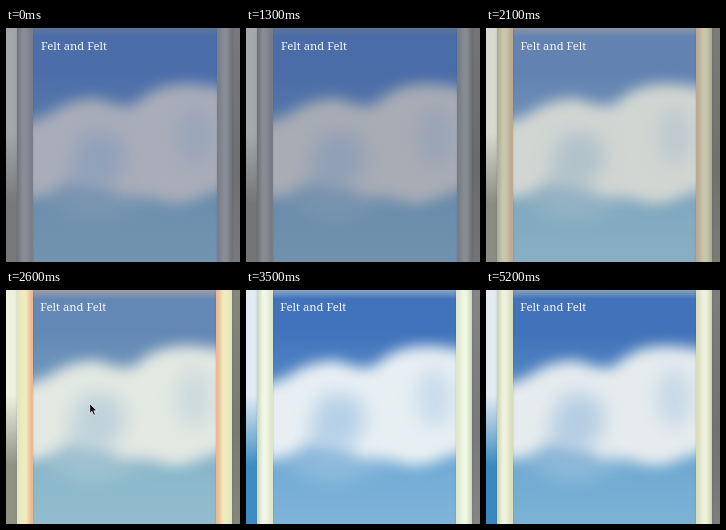
Write an HTML page that moves like this. It is 234 px wide and 234 px high and loops after 5300 ms.

```html
<!DOCTYPE html>
<html lang="en">
<head>
<meta charset="utf-8">
<title>Felt and Felt</title>
<style>
@property --sky { syntax: "<color>"; inherits: true; initial-value: #4b6daa; }
@property --low { syntax: "<color>"; inherits: true; initial-value: #6d90ae; }
@property --cloud { syntax: "<color>"; inherits: true; initial-value: #a9adb9; }
@property --shade { syntax: "<color>"; inherits: true; initial-value: #8b9ebb; }
@property --outer { syntax: "<color>"; inherits: true; initial-value: #6d727b; }
@property --mid { syntax: "<color>"; inherits: true; initial-value: #878c95; }
@property --inner { syntax: "<color>"; inherits: true; initial-value: #797e89; }
@property --leftTop { syntax: "<color>"; inherits: true; initial-value: #a2a6a9; }
@property --leftLow { syntax: "<color>"; inherits: true; initial-value: #77787a; }
@property --right { syntax: "<color>"; inherits: true; initial-value: #77797c; }
@property --shift { syntax: "<length>"; inherits: true; initial-value: 0px; }

html, body { margin: 0; width: 100%; height: 100%; overflow: hidden; }
body { position: relative; background: #888; animation: light 5.3s infinite; }
body > * { position: absolute; }

.left {
  left: 0; top: 0; width: 11px; height: 100%;
  background: linear-gradient(var(--leftTop) 45%, var(--leftLow) 75%);
}
.right {
  left: 225px; right: 0; top: 0; height: 100%;
  background: linear-gradient(var(--right), color-mix(in srgb, var(--right) 85%, #333) 60%, var(--right));
}
.post {
  top: 0; height: 100%;
  background: linear-gradient(var(--side), var(--outer), var(--mid) 35%, var(--mid) 55%, var(--inner) 90%);
  box-shadow: 0 0 2px rgb(60 65 65 / .25);
}
.post.a { --side: 90deg; left: 10.5px; width: calc(16.5px + var(--shift) / 3); }
.post.b { --side: 270deg; left: calc(211px + var(--shift)); right: 8px; }
.pane {
  left: 26px; top: 0; height: 100%; width: 186px;
  overflow: hidden;
  background: linear-gradient(var(--sky) 18%, color-mix(in srgb, var(--sky), var(--low)) 48%,
    var(--low) 80%, color-mix(in srgb, var(--low) 90%, var(--cloud)));
}
.pane::after {
  content: ""; position: absolute; inset: 0 0 auto; height: 9px;
  background: linear-gradient(var(--inner), transparent); opacity: .45;
}
svg { display: block; overflow: visible; }
.pane svg { position: absolute; left: -26px; top: 0; transform: translateX(calc(var(--shift) / 2)); }
.cloud { fill: var(--cloud); filter: blur(7px); }
.shade { fill: var(--shade); filter: blur(10px); opacity: .8; }
.shade.soft { opacity: .5; }
.haze { fill: var(--cloud); filter: blur(9px); opacity: .25; }
.title {
  left: calc(35px + var(--shift) / 2); top: calc(10px + var(--shift) * .4);
  font: 500 11.3px/16px "Noto Serif", serif; color: #f6f7f8; white-space: nowrap;
}
.cursor { left: 83px; top: 113px; visibility: hidden; animation: point 5.3s step-end infinite; }

@keyframes light {
  0% {
    --sky: #4b6daa; --low: #6d90ae; --cloud: #a9adb9; --shade: #8b9ebb;
    --outer: #6d727b; --mid: #878c95; --inner: #797e89;
    --leftTop: #a2a6a9; --leftLow: #77787a; --right: #77797c; --shift: 0px;
    animation-timing-function: steps(13);
  }
  24.528% {
    --sky: #4a6ca8; --low: #6b8eac; --cloud: #a8acb5; --shade: #8b9cb6;
    --outer: #6b7077; --mid: #878b92; --inner: #787d85;
    --leftTop: #a5a9ac; --leftLow: #747577; --right: #727476; --shift: 0px;
    animation-timing-function: steps(5);
  }
  33.962% {
    --sky: #607fae; --low: #7ca1b9; --cloud: #c7cbc9; --shade: #a2b3c1;
    --outer: #85877a; --mid: #b1b1a0; --inner: #a0a092;
    --leftTop: #c9cbc9; --leftLow: #878681; --right: #757672; --shift: -1px;
    animation-timing-function: steps(8);
  }
  49.057% {
    --sky: #6488b5; --low: #8ab8cb; --cloud: #e3e8e2; --shade: #b6cdd9;
    --outer: #dfe3c3; --mid: #efebbc; --inner: #edb995;
    --leftTop: #eef1dd; --leftLow: #8f9283; --right: #85877a; --shift: -1.5px;
    animation-timing-function: steps(9);
  }
  66.038% {
    --sky: #4173bc; --low: #74add6; --cloud: #e8eff3; --shade: #a9c9e5;
    --outer: #c7d5b9; --mid: #eff6e3; --inner: #dee7cd;
    --leftTop: #e1ebf2; --leftLow: #3e8dc2; --right: #858585; --shift: -1.5px;
    animation-timing-function: steps(8);
  }
  81.132% {
    --sky: #4272ba; --low: #72acd3; --cloud: #e7edef; --shade: #a9c7e1;
    --outer: #cbd3a8; --mid: #eef1da; --inner: #d9dfb7;
    --leftTop: #e3ebf0; --leftLow: #3a8abf; --right: #808080; --shift: -1.5px;
    animation-timing-function: steps(9);
  }
  98.113%, 100% {
    --sky: #4272ba; --low: #71abd2; --cloud: #e6ecee; --shade: #a9c6e0;
    --outer: #cad2ab; --mid: #eef1dc; --inner: #d9dfbb;
    --leftTop: #e3ebf0; --leftLow: #3a89be; --right: #7d7d7d; --shift: -1.5px;
  }
}
@keyframes point {
  0%, 54.717% { visibility: hidden; }
  45.283% { visibility: visible; }
}
</style>
</head>
<body>
<div class="left"></div>
<div class="right"></div>
<div class="pane">
  <svg width="234" height="234" viewBox="0 0 234 234">
    <path class="haze" d="M10 150 Q70 205 112 186 T225 165 V140 H10Z"/>
    <path class="cloud" d="M0 97 Q32 95 48 83 Q70 69 94 71 Q112 80 128 77 Q144 61 166 57 Q195 53 240 66
      V156 Q206 162 192 170 Q168 180 150 170 Q128 166 116 169 Q102 158 86 156 Q68 150 56 158 Q40 171 0 171Z"/>
    <path class="shade" d="M74 108 Q96 98 116 112 Q124 132 112 150 Q98 168 76 160 Q58 152 66 134Z"/>
    <ellipse class="shade soft" cx="189" cy="108" rx="18" ry="30"/>
  </svg>
</div>
<div class="post a"></div>
<div class="post b"></div>
<div class="title">Felt and Felt</div>
<svg class="cursor" width="9" height="14" viewBox="0 0 9 14">
  <path d="M.7.7V10.4L3 8.4 4.7 12.3 6.4 11.5 4.8 7.8H7.9Z" fill="#111" stroke="#fff" stroke-width=".7"/>
</svg>
</body>
</html>
```
